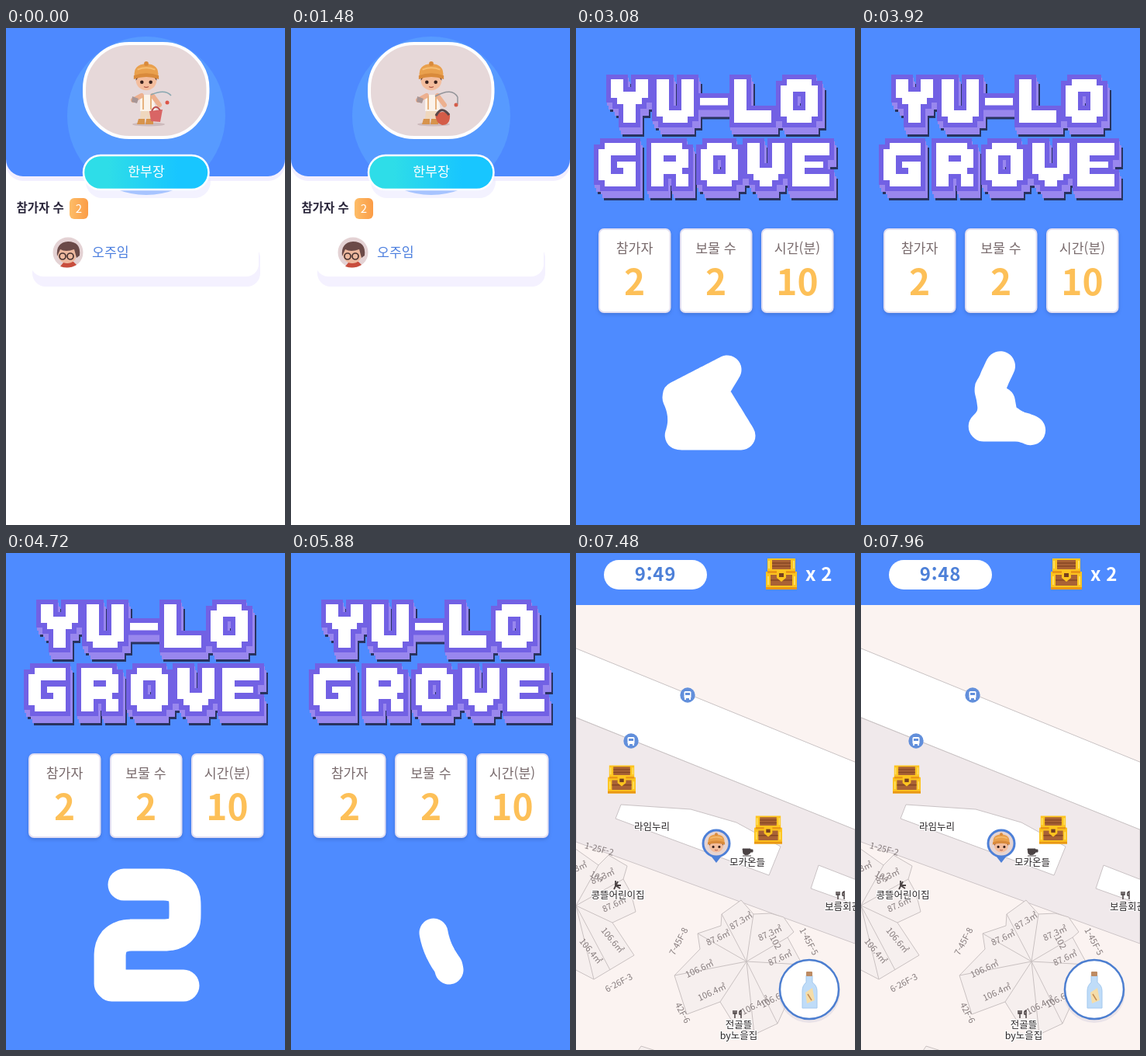
An HTML page that plays this animation: 360x640 px, repeating every 8 s.

```html
<!DOCTYPE html>
<html lang="ko">
<head>
<meta charset="utf-8">
<title>Treasure hunt</title>
<style>
  html, body { margin: 0; width: 100%; height: 100%; overflow: hidden; background: #fff; }
  svg { display: block; }
  #stage { width: 360px; height: 640px; }
  text { font-family: "Noto Sans CJK KR", "Noto Sans CJK", "Noto Sans", sans-serif; }
  .mid { text-anchor: middle; }
  .card rect { fill: #fff; stroke: #e2dff2; stroke-width: 2; filter: drop-shadow(0 2px 2px #2d55a866); }
  .card .label { font-size: 17.3px; fill: #796b6d; }
  .card .count { font-size: 46px; font-weight: 700; fill: #fdc058; }
  .lots { fill: #f6efee; stroke: #c9c1c1; stroke-width: 1; }
  .area text { font-size: 11px; fill: #857b7c; text-anchor: middle; }
  .place text { font-size: 12.5px; font-weight: 500; fill: #292527; text-anchor: middle;
    paint-order: stroke; stroke: #fff; stroke-width: 2px; }
</style>
</head>
<body>
<svg id="stage" viewBox="0 0 360 640">
  <defs>
    <linearGradient id="teal"><stop offset=".2" stop-color="#2edde8"/><stop offset=".75" stop-color="#18c6ff"/></linearGradient>
    <linearGradient id="amber"><stop stop-color="#fdbd68"/><stop offset="1" stop-color="#fb9c46"/></linearGradient>
    <symbol id="head" viewBox="0 0 40 40" overflow="visible">
      <ellipse cx="20" cy="24" rx="14" ry="13" fill="#f3bd9d"/>
      <path d="M6 24Q5 13 20 14Q35 13 34 24L30 18H10Z" fill="#563128"/>
      <path d="M4 18Q2 2 20 1Q38 2 36 18Q20 12 4 18Z" fill="#e9a04d"/>
      <path d="M3 17Q20 11 37 17V22Q20 16 3 22Z" fill="#d98a3b"/>
      <path d="M8 9Q20 4 32 9" fill="none" stroke="#f5bd72" stroke-width="2"/>
      <circle cx="20" cy="1" r="3" fill="#d98a3b"/>
      <circle cx="14" cy="26" r="2.4" fill="#38201d"/><circle cx="26" cy="26" r="2.4" fill="#38201d"/>
      <path d="M17 32Q20 34 23 32" fill="none" stroke="#a84f3f" stroke-width="1.3"/>
    </symbol>
    <symbol id="chest" viewBox="0 0 40 40">
      <path d="M2 0H38V17H40V40H0V17H2Z" fill="#fdc41f"/>
      <path d="M8 2H32V14H8ZM6 21H34V35H6Z" fill="#a96235"/>
      <path d="M8 6H32M8 10H32M6 28H34" stroke="#864725" stroke-width="1.5"/>
      <path d="M2 16H38V19H2ZM0 37H40V40H0Z" fill="#e99716"/>
      <path d="M14 15H26V25L20 30L14 25Z" fill="#fdc41f"/>
      <path d="M17 19H23V24H17Z" fill="#77401f"/>
      <path d="M4 3V13M36 3V13M3 23V34M37 23V34" stroke="#ffdf62" stroke-width="2"/>
    </symbol>
    <symbol id="bus" viewBox="-10 -10 20 20">
      <circle r="9.7" fill="#628fdb"/>
      <rect x="-4.5" y="-5" width="9" height="9" rx="1.5" fill="#fff"/>
      <path d="M-3-3H3V0H-3Z" fill="#628fdb"/><path d="M-3 4V6M3 4V6" stroke="#fff" stroke-width="2"/>
    </symbol>
    <g id="fork" fill="none" stroke="#4b4344" stroke-width="1.5">
      <path d="M-4-5V5M-6-5V-1H-2V-5M4 5V-5Q1-4 2 0H4"/>
    </g>
    <g id="title" fill-rule="evenodd"></g>
  </defs>

  <g id="lobby">
    <rect width="360" height="640" fill="#fff"/>
    <rect y="-20" width="360" height="217" rx="22" fill="#f2efff"/>
    <rect y="-20" width="360" height="211" rx="22" fill="#4d89ff"/>
    <circle cx="181" cy="113" r="102" fill="#579aff"/>
    <rect x="101" y="20" width="159.500" height="121" rx="58" fill="#e6d8d9" stroke="#fff" stroke-width="4"/>
    <g>
      <ellipse cx="184" cy="124" rx="21" ry="2.500" fill="#cdbabc"/>
      <path d="M175 102H191L190 119H182L181 112L178 122H172Z" fill="#efd7bd"/>
      <path d="M171 117H179V124H169ZM181 117H190V124H180Z" fill="#d7934c"/>
      <path d="M173 86H190L193 107H173Z" fill="#fbf3ea"/>
      <path d="M175 87L164 93M189 87L198 99" stroke="#edb08f" stroke-width="6" stroke-linecap="round"/>
      <path d="M163 88L171 91L169 97L162 95Z" fill="#a79595"/>
      <path d="M177 88V105M187 88V105" stroke="#e6b27e" stroke-width="2"/>
      <use href="#head" x="162" y="44" width="38" height="40"/>
      <g id="poseA">
        <path d="M187 86Q205 78 213 87" fill="none" stroke="#88a7b0" stroke-width="1.700"/>
        <circle cx="208" cy="96" r="2.500" fill="#dc5548"/>
        <path d="M185 107L202 105L199 121L187 120Z" fill="#d96565"/>
        <path d="M188 107Q193 97 199 106" fill="none" stroke="#bd504f" stroke-width="2"/>
      </g>
      <g id="poseB">
        <path d="M186 88Q208 76 215 89V98" fill="none" stroke="#939499" stroke-width="1.500"/>
        <circle cx="213" cy="99" r="2.500" fill="#d45d4a"/>
        <path d="M186 111Q196 105 205 111Q206 125 195 125Q187 123 186 111Z" fill="#d45c48"/>
        <path d="M187 113Q194 99 204 112" fill="none" stroke="#59484a" stroke-width="3"/>
      </g>
    </g>
    <rect x="103" y="177" width="161" height="42" rx="21" fill="#eae7ff" opacity=".55"/>
    <rect x="100" y="164" width="161.500" height="44" rx="22" fill="url(#teal)" stroke="#fff" stroke-width="2.500"/>
    <text class="mid" x="181" y="191" font-size="17.300" fill="#fff">한부장</text>
    <text x="13.500" y="237" font-size="15.500" font-weight="700" fill="#2a263b">참가자 수</text>
    <rect x="82" y="219" width="24" height="27" rx="6" fill="url(#amber)"/>
    <text class="mid" x="94" y="237.500" font-size="15" fill="#fff">2</text>
    <rect x="34" y="279" width="294" height="54" rx="17" fill="#f4f1ff"/>
    <rect x="32" y="258" width="294" height="62" rx="16" fill="#fff"/>
    <circle cx="80" cy="289" r="19.500" fill="#e4d2d4"/>
    <path d="M70 307L75 301H87L91 305Q81 311 70 307Z" fill="#c84d3d"/>
    <ellipse cx="79" cy="292" rx="12" ry="11" fill="#eeb99f"/>
    <path d="M66 294Q64 276 80 275Q97 275 95 293L91 296L88 285Q77 289 70 285Z" fill="#6b4a48"/>
    <g fill="none" stroke="#493331" stroke-width="1.700"><circle cx="73" cy="294" r="4"/><circle cx="83" cy="294" r="4"/></g>
    <text x="111" y="294.500" font-size="17.300" fill="#4e80df">오주임</text>
  </g>

  <g id="countdown">
    <rect width="360" height="640" fill="#4e8bff"/>
    <use href="#title" x="5" y="12" fill="#28335f" stroke="#28335f" stroke-width="12"/>
    <use href="#title" x="3" y="9" fill="#9987ee" stroke="#9987ee" stroke-width="12"/>
    <use href="#title" x="1" y="4" fill="#9987ee" stroke="#9987ee" stroke-width="12"/>
    <use href="#title" fill="#7261e4" stroke="#7261e4" stroke-width="12"/>
    <use href="#title" fill="#fff"/>
    <g id="cards"></g>
    <path id="digit" stroke="#fff" stroke-linecap="round" stroke-linejoin="round"/>
  </g>

  <g id="map">
    <rect width="360" height="640" fill="#fbf3f1"/>
    <path d="M0 212L360 356V503L0 372Z" fill="#f0e9eb" stroke="#cdc5c7"/>
    <path d="M-2 122L362 270V357L-2 211Z" fill="#fff" stroke="#c9c3c4"/>
    <path d="M58 324L148 330L207 347L264 378L249 415L51 342Z" fill="#fff" stroke="#c9c2c4"/>
    <path d="M313 402L362 421V453L303 432Z" fill="#fff" stroke="#c9c2c4"/>
    <path class="lots" d="M-2 380L29 402L42 389L66 403L61 420L71 438L77 462L47 476L75 518L23 549L-2 536Z"/>
    <path class="lots" fill="none" d="M0 454L29 402M0 454L61 420M0 454L47 476M0 454L44 537M0 454L23 549"/>
    <path class="lots" d="M127 544L160 510L157 490L187 480L188 465L213 447L229 465L251 464L268 469L281 488L273 495L292 530L282 558L260 606L230 620L204 607L186 578L143 594Z"/>
    <path class="lots" fill="none" d="M220 526L127 544M220 526L157 490M220 526L188 465M220 526L229 465M220 526L273 495M220 526L292 530M220 526L260 606M220 526L230 620M220 526L186 578"/>
    <path class="lots" d="M80 641L84 635L103 641Z"/>
    <g class="area" id="areas"></g>
    <use href="#bus" x="134" y="173" width="20" height="20"/>
    <use href="#bus" x="61" y="232" width="20" height="20"/>
    <use href="#chest" x="41" y="273" width="36" height="37"/>
    <use href="#chest" x="230" y="338" width="36" height="37"/>
    <g class="place">
      <text x="98" y="357">라임누리</text>
      <text x="221" y="403">모카온들</text>
      <text x="54" y="445">콩뜰어린이집</text>
      <text x="344" y="460">보름회관</text>
      <text x="210" y="612">전골뜰</text>
      <text x="210" y="626">by노을집</text>
    </g>
    <path d="M215 381H225V386Q220 391 216 387ZM225 382H228V385H225M215 390H226" fill="#4b4344" stroke="#4b4344"/>
    <path d="M51 422V428L57 432M50 428H58M54 423L49 433" fill="none" stroke="#4b4344" stroke-width="1.800"/>
    <use href="#fork" x="342" y="441"/><use href="#fork" x="209" y="594"/>
    <path d="M174 390H188L181 399Z" fill="#4d80d8"/>
    <circle cx="181" cy="374" r="17" fill="#e6d4d1" stroke="#4d80d8" stroke-width="3"/>
    <use href="#head" x="168" y="361" width="26" height="27"/>
    <circle cx="301" cy="565" r="40" fill="#c8c4d6" opacity=".35"/>
    <circle cx="301" cy="562" r="38" fill="#fff" stroke="#4c7ed0" stroke-width="2.500"/>
    <path d="M297 544H305V553Q311 557 311 564V586H292V564Q292 557 297 553Z" fill="#bfdcf8" stroke="#a3c8ee"/>
    <rect x="297" y="539" width="8" height="6" rx="1" fill="#bd8b63"/>
    <path d="M296 566L305 560L308 576L298 580Z" fill="#f5dda8"/>
    <path d="M299 568L304 576" stroke="#c48c53" stroke-width="1.500"/>
    <rect width="360" height="67" fill="#4f8bff"/>
    <rect x="36" y="9" width="133" height="38" rx="19" fill="#fff"/>
    <text id="clock" class="mid" x="102.500" y="36" font-size="24" font-weight="700" letter-spacing=".8" fill="#4d80d8"></text>
    <use href="#chest" x="245" y="7" width="40" height="40"/>
    <text x="296" y="36" font-size="24" font-weight="700" fill="#fff">x 2</text>
  </g>
</svg>
<script>
const LOOP = 8000, COUNT_AT = 1600, MAP_AT = 7200;
const $ = id => document.getElementById(id);

// Title letters on a six by seven grid
const glyphs = {
  Y: 'M0 0H2V2H4V0H6V3H5V4H4V7H2V4H1V3H0Z',
  U: 'M0 0H2V5H4V0H6V6H5V7H1V6H0Z',
  '-': 'M0 3H4.5V4.200H0Z',
  L: 'M0 0H2V5H6V7H0Z',
  O: 'M1 0H5V1H6V6H5V7H1V6H0V1H1ZM2 2V5H4V2Z',
  G: 'M1 0H6V2H2V5H4V4H3V3H6V7H1V6H0V1H1Z',
  R: 'M0 0H5V1H6V4H5V5H6V7H4V5H2V7H0ZM2 2V3H4V2Z',
  V: 'M0 0H2V4H4V0H6V5H5V6H4V7H2V6H1V5H0Z',
  E: 'M0 0H6V2H2V3H5V4H2V5H6V7H0Z'
};
const titleRow = (word, y, xs) => [...word].map((c, i) =>
  `<path vector-effect="non-scaling-stroke" transform="translate(${xs[i]} ${y}) scale(8)" d="${glyphs[c]}"/>`).join('');
$('title').innerHTML = titleRow('YU-LO', 66, [45, 104, 160, 204, 264]) +
  titleRow('GROVE', 148, [29, 97, 161, 221, 279]);

$('cards').innerHTML = [['참가자', 2], ['보물 수', 2], ['시간(분)', 10]].map(([label, n], i) =>
  `<g class="card" transform="translate(${29 + 105 * i} 258)"><rect x="1" y="1" width="91.500" height="107" rx="6"/>
   <text class="label mid" x="46.500" y="32">${label}</text><text class="count mid" x="46.500" y="86">${n}</text></g>`).join('');

const areas = [
  ['1-25F-2', 29, 385, 15], ['87.3㎡', 36, 420, -25], ['87.6㎡', 51, 456, -25], ['106.6㎡', 44, 501, 50],
  ['106.4㎡', 16, 515, 50], ['6-26F-3', 57, 557, -28], ['7-45F-8', 136, 502, -62], ['87.6㎡', 185, 499, -25],
  ['87.3㎡', 215, 477, -32], ['87.3㎡', 252, 493, -25], ['87.6㎡', 265, 525, -25], ['106.6㎡', 161, 539, -25],
  ['106.4㎡', 177, 569, -25], ['106.4㎡', 233, 586, -28], ['106.6㎡', 258, 577, -28], ['42F-6', 134, 594, 62],
  ['1-45F-5', 297, 502, 62], ['102', 254, 503, 62], ['104', 25, 420, 30], ['.3㎡', 6, 408, -25]
];
$('areas').innerHTML = areas.map(([s, x, y, a]) =>
  `<text transform="translate(${x} ${y}) rotate(${a})">${s}</text>`).join('');

function sample(d, n = 80) {
  const path = document.createElementNS('http://www.w3.org/2000/svg', 'path');
  path.setAttribute('d', d);
  const length = path.getTotalLength();
  return Array.from({ length: n + 1 }, (_, i) => path.getPointAtLength(length * i / n));
}

// Centre lines of the thick digits, five down to zero
const digits = [
  'M229 427H134V492H208Q231 492 231 515V533Q231 557 206 557H152',
  'M205 557V427L134 517H231',
  'M152 427H206Q231 427 231 450V470Q231 492 208 492H170H208Q231 492 231 515V533Q231 557 206 557H152',
  'M152 427H204Q231 427 231 452V468Q231 492 204 492H163Q134 492 134 519V557H229',
  'M154 447L188 427V557',
  'M182 427H163L134 456V528L163 557H202L231 528V456L202 427Z'
].map(d => sample(d));
const wideBlob = sample('M195 440L129 474Q142 500 133 525H213L178 468Z');
const slimBlob = sample('M184 489Q188 512 203 532L204 537');
const STEP = 2800 / 3, FIRST_MORPH = 3080 - STEP, HALF = 230;

function drawDigit(t) {
  const nearest = Math.max(0, Math.min(4, Math.round((t - FIRST_MORPH) / STEP)));
  const offset = t - FIRST_MORPH - nearest * STEP;
  const w = Math.max(0, 1 - Math.abs(offset) / HALF);
  const mix = w * w * (3 - 2 * w);
  const from = digits[nearest + (offset > 0 ? 1 : 0)];
  const blob = nearest < 3 ? wideBlob : slimBlob;
  const points = from.map((p, i) =>
    `${(p.x + (blob[i].x - p.x) * mix).toFixed(1)} ${(p.y + (blob[i].y - p.y) * mix).toFixed(1)}`);
  const el = $('digit');
  el.setAttribute('d', 'M' + points.join('L'));
  el.setAttribute('stroke-width', 41 - 4 * mix);
  el.setAttribute('fill', mix > .6 ? '#fff' : 'none');
}

const show = (id, on) => { $(id).style.display = on ? '' : 'none'; };
const start = performance.now();

function frame() {
  const t = (performance.now() - start) % LOOP;
  show('lobby', t < COUNT_AT);
  show('countdown', t >= COUNT_AT && t < MAP_AT);
  show('map', t >= MAP_AT);
  show('poseA', t < 840);
  show('poseB', t >= 840);
  $('clock').textContent = t < 7640 ? '9:49' : '9:48';
  drawDigit(t);
  requestAnimationFrame(frame);
}
frame();
</script>
</body>
</html>
```
